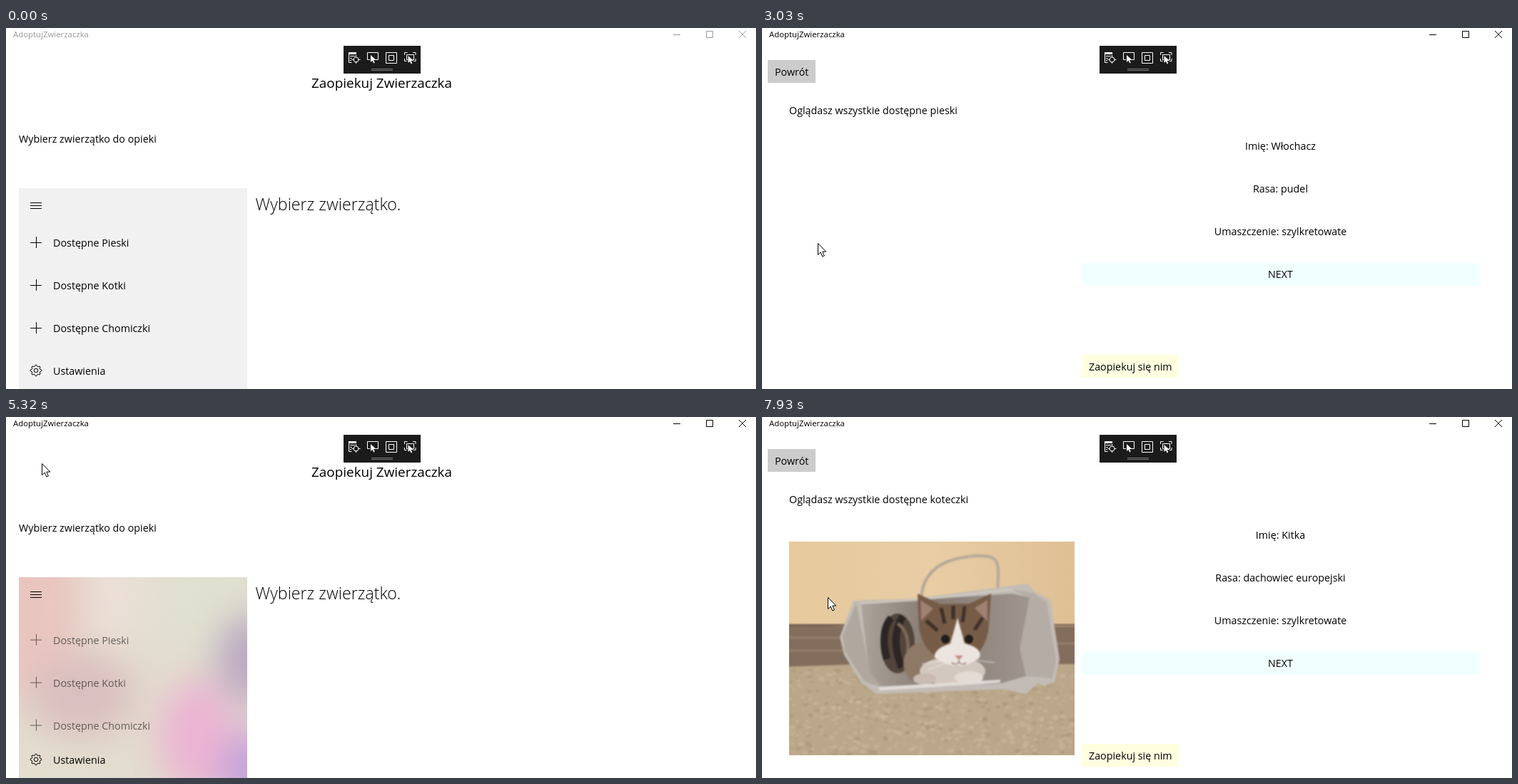
Write an HTML page that moves like this. It is 1051x507 px and loops after 8000 ms.

```html
<!DOCTYPE html>
<html lang="pl">
<head>
<meta charset="utf-8">
<title>AdoptujZwierzaczka</title>
<style>
html, body { margin: 0; width: 100%; height: 100%; overflow: hidden; background: #fff; }
svg { display: block; width: 1051px; height: 507px; font: 14.3px "Open Sans", "Noto Sans", sans-serif; }
filter { color-interpolation-filters: sRGB; }
.line { fill: none; stroke: #000; }
</style>
</head>
<body>
<svg id="stage" viewBox="0 0 1051 507"></svg>
<script>
const LOOP = 8000;
const stage = document.getElementById('stage');

let seed = 7;
const rnd = () => (seed = seed * 16807 % 2147483647) / 2147483647;

const text = (x, y, s, more = '') => `<text x="${x}" y="${y}" ${more}>${s}</text>`;
const mid = (y, s) => text(726.5, y, s, 'text-anchor="middle"');
const rect = (x, y, w, h, fill, more = '') =>
  `<rect x="${x}" y="${y}" width="${w}" height="${h}" fill="${fill}" ${more}/>`;
const oval = (x, y, rx, ry, fill, more = '') =>
  `<ellipse cx="${x}" cy="${y}" rx="${rx}" ry="${ry}" fill="${fill}" ${more}/>`;
const shape = (d, fill, more = '') => `<path d="${d}" fill="${fill}" ${more}/>`;
const stroke = (d, color, w = 1) => shape(d, 'none', `stroke="${color}" stroke-width="${w}"`);
const clip = (id, x, y, w, h) => `<clipPath id="${id}">${rect(x, y, w, h, '#000')}</clipPath>`;
const blur = (id, r) => `<filter id="${id}" x="-50%" y="-50%" width="200%" height="200%"><feGaussianBlur stdDeviation="${r}"/></filter>`;
const soft = (id, s) => `<g filter="url(#${id})">${s}</g>`;

// Seeded spots inside a box
function spots(n, x, y, w, h, r, colors, opacity = .6) {
  let out = '';
  for (let i = 0; i < n; i++) {
    const size = r * (.5 + rnd());
    out += oval((x + rnd() * w).toFixed(1), (y + rnd() * h).toFixed(1), size.toFixed(1),
      (size * .7).toFixed(1), colors[i % colors.length], `opacity="${opacity}"`);
  }
  return out;
}

// Spots inside an ellipse
function tuft(n, cx, cy, rx, ry, r, colors, opacity = .6) {
  let out = '';
  for (let i = 0; i < n; i++) {
    const a = rnd() * 6.283, d = Math.sqrt(rnd());
    out += oval((cx + Math.cos(a) * d * rx).toFixed(1), (cy + Math.sin(a) * d * ry).toFixed(1),
      r, r, colors[i % colors.length], `opacity="${opacity}"`);
  }
  return out;
}

function fir(x, top, bottom, half, color) {
  let out = '';
  for (let i = 1; i <= 16; i++) {
    const y = top + (bottom - top) * i / 16, w = half * (i / 16) ** .7 * (.75 + rnd() * .4);
    out += shape(`M${x} ${y - 30}L${x + w} ${y}L${x + w / 3} ${y - 3}L${x} ${y + 4}L${x - w / 2} ${y - 3}L${x - w} ${y - 1}Z`, color);
  }
  return out;
}

const plus = y => stroke(`M34 ${y}.5h16M42.5 ${y - 8}v16`, '#000');

function gear(cx, cy) {
  const pts = [];
  for (let i = 0; i < 32; i++) {
    const r = i % 4 < 2 ? 7.8 : 6, a = (i - .5) * Math.PI / 16;
    pts.push((cx + r * Math.cos(a)).toFixed(2) + ' ' + (cy + r * Math.sin(a)).toFixed(2));
  }
  return `<g class="line">${shape('M' + pts.join('L') + 'Z', 'none')}<circle cx="${cx}" cy="${cy}" r="2.8"/></g>`;
}

const arrow = (x, y) => shape(`M${x} ${y}v10l2.4-2.2 1.8 3.6 1.6-.8-1.7-3.5h3.4z`, '#fff');
const toolbar = rect(473, 25, 108, 39, '#1b1b1b') +
  stroke('M512 57.5h30M512 59.5h30', '#777') +
  shape('M480 34h11v3h-11z', '#fff') +
  stroke('M480.5 35v13.5h4M482 39.5h7M482 42.5h3M482 45.5h2M490.5 38v3M490.5 47v3M484.5 44.5h3M493.5 44.5h3M494 44.5a3.5 3.5 0 1 0-7 0a3.5 3.5 0 1 0 7 0', '#fff') +
  stroke('M510 44.5h-3.5v-10h15v10h-4M532.5 34.5h15v15h-15zM536.5 38.5h7v7h-7z', '#fff') +
  stroke('M558.5 38v-3.500h4M570 34.5h4v3.500M558.500 43v3.500h3M574 43v3.500h-3M563 44.500h-1.500v-7h10v7h-2', '#fff') +
  arrow(511, 38) + arrow(563.5, 39);

const acrylic = `<g id="acrylic" clip-path="url(#pane)">${rect(18, 225, 320, 282, '#e3dccf')}` + soft('haze',
  oval(20, 265, 85, 120, '#e9c5bf') +
  oval(105, 390, 75, 60, '#dabfbf') +
  oval(155, 250, 40, 75, '#ebdfd7') +
  oval(280, 250, 75, 85, '#dfe0d0') +
  oval(345, 340, 50, 62, '#bba9c0') +
  oval(268, 450, 52, 80, '#ebb3d2') +
  oval(345, 500, 45, 62, '#c5a4da') +
  oval(45, 515, 110, 45, '#e3decf')) + '</g>';

const entries = ['Pieski', 'Kotki', 'Chomiczki'].map((s, i) =>
  plus(301 + 60 * i) + text(66, 307 + 60 * i, 'Dostępne ' + s)).join('');

const menu = `<g id="menu">${text(428, 84, 'Zaopiekuj Zwierzaczka', 'font-size="18.9"')}
  ${text(18, 161, 'Wybierz zwierzątko do opieki')}
  ${text(349.5, 256, 'Wybierz zwierzątko.', 'font-size="23.2" font-weight="300"')}
  ${rect(18, 225, 320, 282, '#f1f1f1')}${acrylic}
  ${rect(18, 281, 320, 40, '#000', 'id="hover"')}
  ${stroke('M34 245.5h16M34 249.5h16M34 253.5h16', '#000')}
  <g id="entries">${entries}</g>${gear(42, 481)}${text(66, 487, 'Ustawienia')}</g>`;

const petPage = (id, kind, name, breed, photo) => `<g id="${id}">
  ${rect(8, 45, 67, 32, '#ccc')}${text(18, 67, 'Powrót')}
  ${text(38, 121, 'Oglądasz wszystkie dostępne ' + kind)}
  ${mid(171, 'Imię: ' + name)}${mid(231, 'Rasa: ' + breed)}${mid(291, 'Umaszczenie: szylkretowate')}
  ${rect(448, 330, 557, 31.5, '#f0ffff')}${mid(351, 'NEXT')}
  ${rect(448, 459, 136, 32, '#ffffe0')}${text(458, 481, 'Zaopiekuj się nim')}
  <g id="${id}Photo" clip-path="url(#${id}Box)">${photo}</g></g>`;

const fur = ['#bd8a67', '#8f5e43', '#a87453'];
const dogPhoto = rect(38, 196, 400, 259, '#edf0f1') + soft('blur2',
  shape('M30 208h28l8 6 28-5 12 6h34v35H30z', '#c9beb2') +
  shape('M268 222l20-8 35-4 10 6 45 2v28H268z', '#cdb9ab') +
  stroke('M45 220h80M45 229h90M275 224h95', '#a59d94', 2) +
  shape('M30 244L130 238L200 226L265 232L345 238L390 224L450 200V330H30Z', '#6f7555') +
  spots(220, 38, 246, 400, 66, 8, ['#5c6847', '#848c5c', '#626149', '#748451'], .55) +
  spots(50, 395, 202, 43, 70, 8, ['#5e6951', '#7e8566'], .6) +
  tuft(60, 72, 270, 38, 27, 7, ['#6e6a4a', '#858556', '#565a41'], .6) +
  shape('M30 262l45 26v16H30z', '#d3d7d9') + shape('M30 260l44 22v6L30 268z', '#5c6670') +
  shape('M30 304L130 308L300 330L450 352V460H30Z', '#5a8739') +
  spots(90, 38, 322, 400, 125, 10, ['#67953f', '#4c7633', '#6f9b48'], .5) +
  shape('M30 386L120 414V440L95 460L30 430Z', '#a9a8a2') +
  shape('M285 397L450 403V413L300 403Z', '#b6b4ad') +
  tuft(70, 292, 320, 42, 40, 7, ['#566a40', '#687b4a', '#465a3b'], .7) +
  tuft(130, 418, 312, 32, 54, 5, ['#8c9d40', '#75893a', '#a0ac50'], .7) +
  stroke('M408 196v85M425 200v65M398 215v60', '#4c5844', 3)) +
  soft('blur1',
  fir(172, 192, 378, 50, '#2e463c') +
  tuft(90, 172, 320, 42, 55, 4, ['#22372f', '#4b6653', '#3b5547'], .6) +
  stroke('M318 350v42', '#695d50', 3) +
  tuft(260, 318, 354, 38, 34, 2.5, ['#d5d1d4', '#b6b6b2', '#e7e3e6'], .75) +
  stroke('M82 318v72M98 310v85M56 325v55', '#394039', 2) +
  rect(79, 318, 7, 14, '#4b514a') + rect(95, 310, 7, 14, '#4b514a') +
  shape('M118 460L120 418L145 411L188 408L295 413L345 420L390 433L425 460Z', '#989a94') +
  spots(170, 122, 416, 260, 38, 4, ['#b9bab3', '#737771', '#a5a69e'], .5) +
  shape('M200 318H268L274 360L278 412Q268 424 242 420L235 398L228 421Q200 424 189 412L198 360Z', '#9c6849') +
  tuft(200, 235, 352, 36, 42, 3, fur, .5) +
  tuft(70, 209, 404, 19, 16, 3, fur, .5) + tuft(70, 259, 404, 18, 16, 3, fur, .5) +
  stroke('M235 375V420', '#5f3f2f', 4) +
  shape('M205 268Q180 282 180 302Q184 325 205 324L216 290ZM238 266Q262 262 276 294Q282 318 262 328Q240 326 236 300Z', '#a97455') +
  tuft(60, 197, 302, 14, 20, 3, fur, .5) + tuft(110, 257, 297, 17, 27, 3, fur, .5) +
  oval(223, 270, 25, 18, '#c4936f') + oval(221, 290, 18, 22, '#b38060') +
  tuft(60, 224, 267, 23, 14, 3, ['#d0a17b', '#b78766'], .5) +
  oval(216, 300, 8, 7, '#5d382c') + oval(214, 308, 4.5, 8, '#dba49d') +
  oval(211, 292, 5, 4, '#27201f') + oval(211, 279, 2.3, 2, '#2d211d') + oval(228, 280, 2.3, 2, '#2d211d'));

const catPhoto = rect(38, 175, 400, 125, 'url(#wall)') + soft('blur1',
  shape('M30 291L130 294H450V355H30Z', '#836d5c') +
  stroke('M30 292H450', '#66544a', 2) + stroke('M30 310H120M30 328H130M410 318H450', '#947e6c', 3) +
  shape('M30 351L140 347H450V485H30Z', '#baa688') +
  spots(800, 38, 354, 400, 121, 3, ['#cbb99c', '#a28e70', '#c3b092', '#d2c1a4'], .45) +
  stroke('M223 256C225 207 268 197 300 195C335 194 332 204 330 245', '#b5a899', 4) +
  shape('M128 258L216 255L350 237L372 234L384 246L404 257L417 340L410 372L396 378L386 374L370 389L340 382L160 389L140 374L115 334L109 309Z', '#c3bcb6') +
  shape('M139 262L218 257L350 248L379 254L365 325L370 364L335 374L165 380L150 358Z', 'url(#inside)') +
  shape('M132 261L151 357L168 379L144 372L116 329L113 308Z', '#b0a79f') +
  shape('M352 243L375 254L361 325L370 364L407 367L412 340L399 260L380 247Z', '#b5aca5') +
  stroke('M138 262L219 257L351 242', '#d2ccc5', 2) +
  oval(190, 318, 24, 42, '#51443b') +
  stroke('M181 282Q165 300 175 340M197 280Q179 312 196 352', '#2b2523', 10) +
  stroke('M190 290Q207 302 204 330', '#7b6858', 5) +
  oval(228, 346, 30, 30, '#8e7866') + oval(267, 357, 46, 20, '#d3c8c0') +
  shape('M218 248L250 263L291 262L321 248L318 292Q316 334 274 350Q226 338 220 296Z', '#765b47') +
  shape('M222 257L240 269L223 286ZM316 257L298 268L316 287Z', '#a08072') +
  stroke('M251 268L256 290M268 265V284M284 266L281 288M230 286L246 300M309 282L298 299', '#3d3029', 5) +
  shape('M274 282L284 318Q309 324 305 338Q276 361 242 338Q240 326 264 318Z', '#ece4df') +
  oval(257, 312, 8, 7, '#98734e') + oval(290, 312, 8, 7, '#98734e') +
  oval(257, 312, 6.5, 6.5, '#211d1b') + oval(290, 312, 6.5, 6.5, '#211d1b') +
  shape('M270 335h12l-6 6z', '#c08a7e') + stroke('M276 341v4q-6 4-10 0m10 0q6 4 10 0', '#86645b', 1.2) +
  stroke('M259 341L224 347M260 345L232 355M294 341L326 345', '#f1ece6', .8) +
  oval(228, 368, 16, 8, '#c9bbb1') + oval(290, 366, 20, 9, '#e4dbd5') +
  shape('M163 379L334 369V373L165 384Z', '#e2ddd8'));

stage.innerHTML = `<defs>
  ${clip('pane', 18, 225, 320, 282)}${clip('dogBox', 38, 196, 400, 259)}${clip('catBox', 38, 175, 400, 300)}
  ${blur('haze', 24)}${blur('blur1', .9)}${blur('blur2', 1.8)}
  <linearGradient id="wall"><stop stop-color="#e6c99c"/><stop offset=".5" stop-color="#e8cda5"/><stop offset="1" stop-color="#e0bf94"/></linearGradient>
  <linearGradient id="inside"><stop stop-color="#aca39b"/><stop offset=".4" stop-color="#857b73"/><stop offset="1" stop-color="#a0968f"/></linearGradient>
  </defs>${rect(0, 0, 1051, 507, '#fff')}
  <g id="frame">${text(10, 13, 'AdoptujZwierzaczka', 'font-size="11.4"')}
  <path d="M935 9.5h10M981.5 4.5h9v9h-9zM1027 4l10 10M1037 4l-10 10" fill="none" stroke="currentColor"/></g>
  ${menu}
  ${petPage('dog', 'pieski', 'Włochacz', 'pudel', dogPhoto)}
  ${petPage('cat', 'koteczki', 'Kitka', 'dachowiec europejski', catPhoto)}
  ${rect(9, 46, 65, 30, '#000', 'id="backHover" stroke="#7a7a7a" stroke-width="2"')}
  ${toolbar}
  <path id="cursor" d="M.5.5v16l3.700-3.500 2.600 6 2.600-1.100-2.600-5.800h5z" fill="#fff" stroke="#000"/>`;

// Pointer runs: start, end, steps, then a quadratic curve
const runs = [
  [310, 1060, 8, 803, 484, 420, 430, 88, 299],
  [1170, 1940, 8, 86, 297, 70, 222, 75, 296],
  [2040, 2160, 2, 76, 299, 77, 301, 78, 302],
  [4120, 4880, 8, 80, 303, 128, 200, 50, 65],
  [5440, 5990, 6, 51, 68, 60, 180, 92, 298],
  [6090, 6200, 2, 97, 350, 98, 362, 98, 373],
  [6400, 6530, 2, 99, 370, 100, 368, 100, 366],
  [7720, 7930, 3, 106, 340, 100, 300, 92, 253]
];

function pointer(t) {
  const run = runs.filter(r => r[0] <= t).pop();
  if (!run) return null;
  const [start, end, n, x0, y0, cx, cy, x1, y1] = run;
  const step = Math.min(n - 1, Math.floor((t - start) / (end - start) * (n - 1) + 1e-6));
  const k = Math.sin(step / (n - 1) * Math.PI / 2);
  const curve = (a, b, c) => Math.round((1 - k) ** 2 * a + 2 * k * (1 - k) * b + k * k * c);
  return [curve(x0, cx, x1), curve(y0, cy, y1)];
}

const el = id => document.getElementById(id);
const show = (id, on) => el(id).setAttribute('display', on ? 'inline' : 'none');

function draw(now) {
  const t = now % LOOP;
  const page = t < 3030 ? 'menu' : t < 5320 ? 'dog' : t < 6960 ? 'menu' : 'cat';
  const active = t >= 3030;
  const at = pointer(t), [x, y] = at || [-99, -99];

  for (const id of ['menu', 'dog', 'cat']) show(id, id === page);
  show('dogPhoto', t >= 3140);
  show('acrylic', active);
  const tone = active ? '#000' : '#999';
  el('frame').setAttribute('fill', tone);
  el('frame').setAttribute('color', tone);

  show('cursor', at);
  el('cursor').setAttribute('transform', `translate(${x} ${y})`);

  const row = Math.floor((y - 281) / 60);
  show('hover', x >= 18 && x < 338 && row >= 0 && row < 4 && y - 281 - row * 60 < 40);
  el('hover').setAttribute('y', 281 + row * 60);
  el('hover').setAttribute('opacity', t >= 6860 ? .27 : .09);
  show('backHover', page === 'dog' && x >= 8 && x < 75 && y >= 45 && y < 77);
  el('backHover').setAttribute('fill-opacity', t >= 5200 ? .25 : 0);

  // Entries rise and fade in after returning to the menu
  const age = 110 + 113 * Math.floor((t - 5320) / 113);
  const entering = page === 'menu' && active;
  el('entries').setAttribute('transform', `translate(0 ${entering ? 28 * Math.exp(-age / 125) : 0})`);
  el('entries').setAttribute('opacity', entering ? Math.min(1, age / 200) : 1);
}

const begin = performance.now();
function tick() {
  draw(performance.now() - begin);
  requestAnimationFrame(tick);
}
tick();
</script>
</body>
</html>
```
